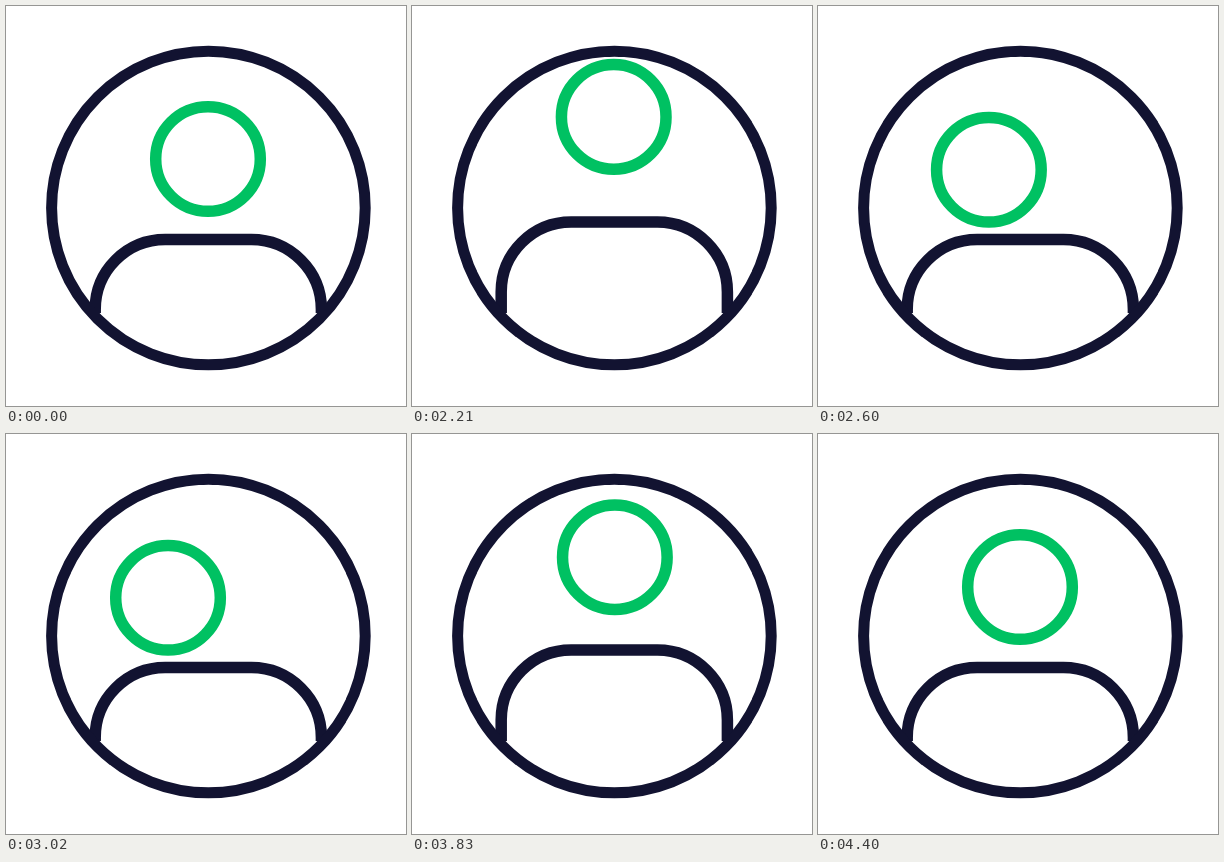
Animation, 400 px wide and 400 px high, one loop 4490 ms. Source, as an HTML page:

```html
<!DOCTYPE html>
<html lang="en">
<head>
<meta charset="utf-8">
<title>Avatar</title>
<style>
  html, body { margin: 0; height: 100%; overflow: hidden; background: #fff; }
  svg { display: block; width: 100vw; height: 100vh; fill: none; stroke: #121331; stroke-width: 11.5; }
</style>
</head>
<body>
<svg viewBox="0 0 400 400">
  <circle id="head" r="52.3" stroke="#00c162"/>
  <path id="body"/>
  <circle cx="202.4" cy="202" r="156.8" stroke-width="11"/>
</svg>
<script>
const LOOP = 4490, STEP = 30, OFFSET = 20;
const JUMP_LEFT = 2000, SLIDE = 2990, JUMP_BACK = 3560;
const head = document.getElementById('head');
const body = document.getElementById('body');
const origin = performance.now();

// Eased 0 to 1 over the span
function ramp(t, start, span) {
  const p = Math.min(1, Math.max(0, (t - start) / span));
  return p * p * (3 - 2 * p);
}

// Rises to 1, waits, falls back to 0
const hop = (t, start, rise, wait, fall) =>
  ramp(t, start, rise) - ramp(t, start + rise + wait, fall);

function draw() {
  const elapsed = (performance.now() - origin) % LOOP;
  const t = Math.floor((elapsed - OFFSET) / STEP) * STEP + OFFSET;

  const headX = 202 - 42 * ramp(t, JUMP_LEFT + 180, 630)
    + 72 * ramp(t, SLIDE, 300) - 30 * ramp(t, JUMP_BACK, 300);
  const headLift = hop(t, JUMP_LEFT, 240, 0, 260) + hop(t, JUMP_BACK, 405, 90, 345);
  const sink = ramp(t, JUMP_LEFT + 240, 260) - ramp(t, JUMP_BACK, 405);
  const bodyLift = hop(t, JUMP_LEFT, 210, 120, 270) + hop(t, JUMP_BACK, 270, 140, 430);
  const top = 233.5 - 17.5 * bodyLift;

  head.setAttribute('cx', headX);
  head.setAttribute('cy', 153 - 44 * headLift + 10.8 * sink);
  body.setAttribute('d',
    `M89.2 307V${top + 70}a70 70 0 0 1 70-70H245.4a70 70 0 0 1 70 70V307`);
  requestAnimationFrame(draw);
}
draw();
</script>
</body>
</html>
```
